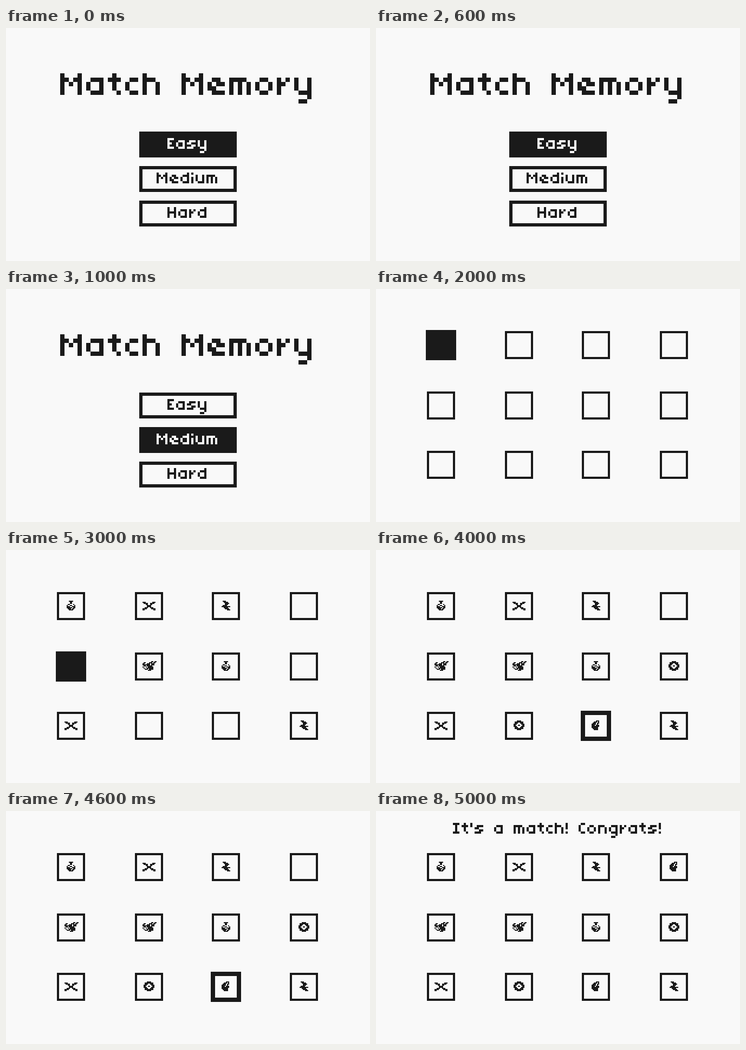
Recreate the animation shown at these times as an HTML page. Size 672 by 432 pixels, loop 6000 ms.

```html
<!DOCTYPE html>
<html lang="en">
<head>
<meta charset="utf-8">
<title>Match Memory</title>
<style>
  html, body { margin: 0; width: 100%; height: 100%; overflow: hidden; background: #f9f9f9; }
  svg { display: block; width: 672px; height: 432px; shape-rendering: crispEdges; }
  .scene { opacity: 0; }
  .pen { fill: none; stroke-width: 1; stroke-linecap: square; }
</style>
</head>
<body>
<svg id="stage" viewBox="0 0 672 432"></svg>
<script>
const INK = '#1a1a1a', PAPER = '#f9f9f9';
const STEP = 1000;

// Letter strokes on a cell grid: [width, path through cell centres]
const LETTERS = {
  ' ': [3, ''],
  '!': [1, 'M0 0v2M0 4h0'],
  "'": [1, 'M0 0v1'],
  C: [3, 'M1 0h1M0 1v2M1 4h1'],
  E: [3, 'M2 0h-2v4h2M0 2h1'],
  H: [4, 'M0 0v4M3 0v4M0 2h3'],
  I: [3, 'M0 0h2M1 0v4M0 4h2'],
  M: [5, 'M0 0v4M4 0v4M1 1h0M3 1h0M2 2h0'],
  a: [4, 'M1 1h2v3h-2M0 2v1'],
  c: [3, 'M1 1h1M0 2v1M1 4h1'],
  d: [4, 'M3 0v4h-2M0 2v1M1 1h2'],
  e: [4, 'M1 1h1M0 2v1M2 2h1M1 3h0M1 4h2'],
  g: [4, 'M1 1h2v4M0 2v1M1 4h2M1 6h1'],
  h: [4, 'M0 0v4M1 1h1M3 2v2'],
  i: [1, 'M0 0h0M0 2v2'],
  m: [5, 'M0 4v-3h3M2 1v3M4 2v2'],
  n: [4, 'M0 4v-3h2M3 2v2'],
  o: [4, 'M1 1h1M0 2v1M3 2v1M1 4h1'],
  r: [3, 'M0 1v3M2 1h0M1 2h0'],
  s: [4, 'M1 1h2M0 2h1M2 3h1M0 4h2'],
  t: [3, 'M0 1h2M1 0v3M2 4h0'],
  u: [4, 'M0 1v2M3 1v3h-2'],
  y: [4, 'M0 1v2M1 4h2M3 1v4M1 6h1']
};

// Icon strokes, relative to the card centre
const ICONS = {
  potion: 'M-2-5h3M-1-4h1M-1-3h1M-3-2h1M2-2h0M-4-1h0M-1-1h1M3-1h0M-4 0h2M1 0h2M-4 1h4M2 1h1M-3 2h2M1 2h1M-2 3h3',
  swords: 'M-6-4h2M3-4h2M-5-3h3M1-3h3M-3-2h1M1-2h1M-2-1h3M-2 0h3M-4 1h2M1 1h2M-6 2h3M2 2h3M-6 3h1M4 3h1',
  bolt: 'M-3-5h2M-2-4h3M-1-3h3M-1-2h2M-3-1h3M-4 0h7M-2 1h3M-1 2h3M1 3h2',
  flame: 'M0-5h2M-2-4h2M2-4h0M-3-3h2M1-3h1M-4-2h3M1-2h0M-4-1h2M0-1h2M-4 0h6M-4 1h5M-3 2h4M-2 3h3',
  dragon: 'M2-5h1M5-5h1M-5-4h1M0-4h2M4-4h1M-6-3h1M-2-3h2M2-3h2M-6-2h6M2-2h2M-5-1h1M-2-1h4M-6 0h0M-3 0h0M-1 0h4M-5 1h0M-2 1h5M-4 2h2M0 2h3M-1 3h2',
  target: 'M-2-5h3M-4-4h7M-4-3h2M1-3h2M-5-2h2M2-2h2M-5-1h1M-1-1h1M3-1h1M-5 0h2M2 0h2M-4 1h2M1 1h2M-4 2h7M-2 3h3'
};

const DECK = ['potion', 'swords', 'bolt', 'flame',
              'dragon', 'dragon', 'potion', 'target',
              'swords', 'target', 'flame', 'bolt'];
const COLUMNS = [120, 264, 406, 550], ROWS = [104, 216, 326];

const pen = (path, x, y, cell, color = INK) =>
  `<path class="pen" stroke="${color}" d="${path}" transform="translate(${x} ${y}) scale(${cell}) translate(.5 .5)"/>`;

const box = (x, y, w, h, border, fill = PAPER) =>
  `<rect x="${x + border / 2}" y="${y + border / 2}" width="${w - border}" height="${h - border}"
    fill="${fill}" stroke="${INK}" stroke-width="${border}"/>`;

// Centres the text on the stage, counting the gap after each letter
function text(string, y, cell, color) {
  const advance = [...string].reduce((sum, ch) => sum + LETTERS[ch][0] + 1, 0);
  let x = 336 - advance * cell / 2;
  const strokes = [...string].map(ch => {
    const [width, path] = LETTERS[ch];
    const mark = pen(path, x, y, cell, color);
    x += (width + 1) * cell;
    return mark;
  });
  return `<g role="img" aria-label="${string}">${strokes.join('')}</g>`;
}

function menu(selected) {
  const buttons = ['Easy', 'Medium', 'Hard'].map((label, i) => {
    const y = 192 + 64 * i, active = i === selected;
    return box(246, y, 180, 48, 6, active ? INK : PAPER) +
      text(label, y + 12, 4, active ? PAPER : INK);
  });
  return text('Match Memory', 84, 8) + buttons.join('');
}

function board(isOpen, selected) {
  return DECK.map((icon, i) => {
    const x = COLUMNS[i % 4], y = ROWS[Math.floor(i / 4)];
    const open = isOpen(i), active = i === selected;
    const half = active ? 28 : 26;
    const fill = active && !open ? INK : PAPER;
    return box(x - half, y - half, 2 * half, 2 * half, active ? 8 : 4, fill) +
      (open ? pen(ICONS[icon], x, y, 2) : '');
  }).join('');
}

const scenes = [
  menu(0),
  menu(1),
  board(() => false, 0),
  board(i => [0, 1, 2, 5, 6, 8, 11].includes(i), 4),
  board(i => i !== 3, 10),
  board(() => true) + text("It's a match! Congrats!", 22, 4)
];

const stage = document.getElementById('stage');
stage.innerHTML = scenes.map(scene => `<g class="scene">${scene}</g>`).join('');

const count = scenes.length;
stage.querySelectorAll('.scene').forEach((scene, i) => {
  scene.animate([
    { opacity: 0, offset: 0, easing: 'step-end' },
    { opacity: 1, offset: i / count, easing: 'step-end' },
    { opacity: 0, offset: (i + 1) / count, easing: 'step-end' },
    { opacity: 0, offset: 1 }
  ], { duration: count * STEP, iterations: Infinity });
});
</script>
</body>
</html>
```
